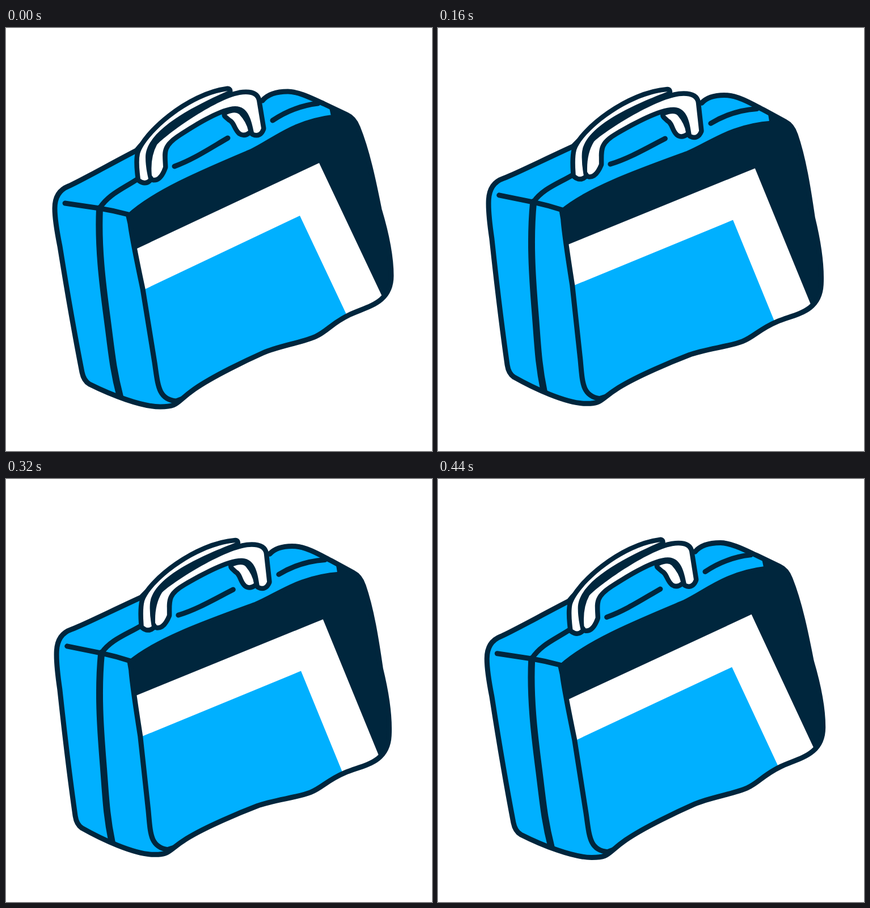
Recreate the animation shown at these times as an HTML page. Size 751 by 746 pixels, loop 0.48 s.

```html
<!DOCTYPE html>
<html lang="en">
<head>
<meta charset="utf-8">
<title>Briefcase</title>
<style>
  html, body { margin: 0; height: 100%; overflow: hidden; background: #fff; }
  svg { display: block; width: 100%; height: 100%; }
  .navy { fill: #00263d; }
  .blue { fill: #00b0ff; }
  .white { fill: #fff; }
  .line { fill: none; stroke: #00263d; stroke-width: 9px; stroke-linecap: round; stroke-linejoin: round; }
  .seam { stroke-width: 12px; }
  .rim { stroke-width: 17px; }
</style>
</head>
<body>
<svg viewBox="0 0 751 746">
  <defs>
    <path id="body" d="M86 318C86 297 95 285 110 279S182 241 230 216Q300 130 452 128C462 116 477 112 497 112
      S545 127 561 134L601 153Q614 159 620 175C637 217 648 270 658 320Q679 390 679 437C679 486 636 491 605 506
      S567 534 546 544S480 561 453 573S365 614 332 637S305 668 272 668S185 647 147 628Q137 622 134 607
      Q115 510 95 385Q86 340 86 318Z"/>
    <path id="face" d="M216 332C262 289 352 252 432 218C472 199 505 166 578 157L574 138 720 150V500L300 658
      C268 655 268 630 262 590L241 460Q222 370 219 345Z"/>
    <path id="grip" d="M237 266Q233 236 236 222C246 188 322 120 391 111C340 134 246 178 246 228Q246 245 251 266
      Q245 272 237 266ZM257 260Q254 228 266 206C282 188 368 126 412 118Q439 114 442 128L450 177Q446 188 437 184
      C433 165 428 138 404 138S335 165 303 186S276 220 277 245Q270 265 260 264ZM389 153Q404 146 411 152
      Q424 166 427 181Q420 187 414 183C406 176 406 164 396 159Z"/>
    <clipPath id="inBody"><use href="#body"/></clipPath>
    <clipPath id="inFace"><use href="#face"/></clipPath>
  </defs>

  <g id="case">
    <use href="#body" class="blue"/>
    <g clip-path="url(#inBody)">
      <use href="#face" class="navy"/>
      <g clip-path="url(#inFace)">
        <path class="white" d="M200 403.5L552 238 720 594 200 700Z"/>
        <path class="blue" d="M200 482L518 331 660 632 200 700Z"/>
      </g>
      <use href="#face" class="line"/>
      <path class="line seam" d="M165 318C162 385 170 450 178 510S188 600 201 650"/>
    </g>
    <path class="line" d="M104 309L165 318Q190 322 216 329M165 318C180 294 205 284 231 267
      M470 163Q507 138 550 133M297 244C330 232 360 212 391 194"/>
    <use href="#body" class="line"/>
    <use href="#grip" class="line rim"/>
    <use href="#grip" class="white"/>
  </g>
</svg>
<script>
  const bag = document.getElementById("case");
  const STEP = 40, STEPS = 12, SWING = 4;

  // Cosine swing out and back, held for each step
  function draw() {
    const phase = Math.floor(performance.now() / STEP) % STEPS / STEPS;
    const angle = SWING / 2 * (1 - Math.cos(2 * Math.PI * phase));
    bag.setAttribute("transform", `rotate(${angle} 375.5 373)`);
    requestAnimationFrame(draw);
  }
  draw();
</script>
</body>
</html>
```
